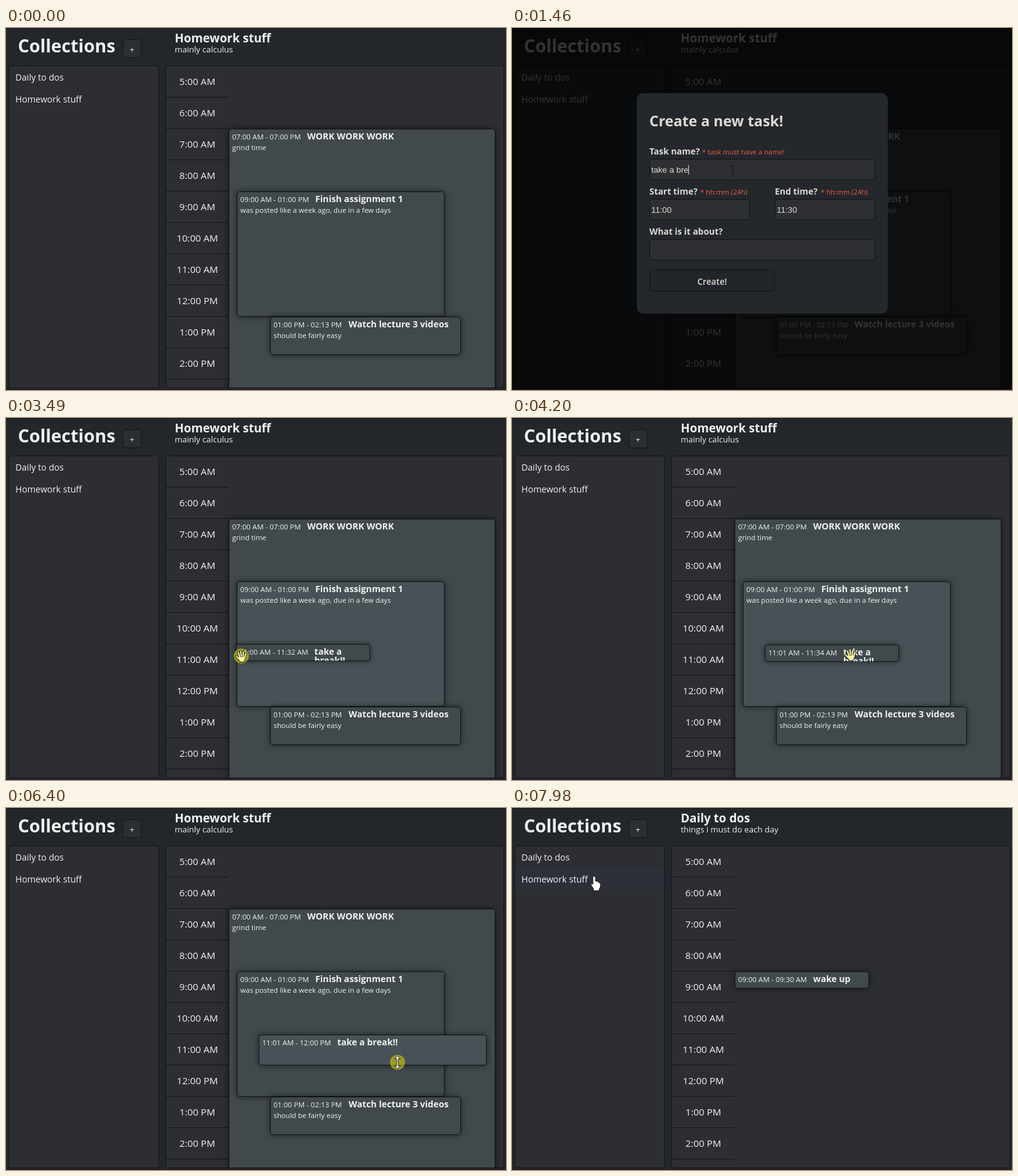
These frames come from a looping animation (797 by 578 pixels, 8000 ms). An HTML page:

```html
<!DOCTYPE html>
<html lang="en">
<head>
<meta charset="utf-8">
<title>Task planner</title>
<style>
html, body { margin: 0; width: 100%; height: 100%; overflow: hidden; background: #23262b; }
svg { display: block; width: 797px; height: 578px; }
text { font-family: "Open Sans", "Noto Sans", sans-serif; font-weight: 500; fill: #f0f2f0; white-space: pre; }
.h1 { font-size: 28.3px; font-weight: 700; }
.h2 { font-size: 18.9px; font-weight: 700; }
.sub { font-size: 13.1px; }
.item { font-size: 14.1px; }
.hour { font-size: 15.2px; text-anchor: middle; }
.time { font-size: 11.5px; }
.note { font-size: 11.35px; }
.name { font-size: 14.2px; font-weight: 700; }
.panel { fill: #2c2e33; stroke: #131518; }
.line { stroke: #131518; }
.card { fill: #41494d; stroke: #131618; filter: drop-shadow(0 0 4px rgba(0,0,0,.62)); }
.card.hot { fill: #485256; }
.field { fill: #2d2f33; stroke: #111316; }
#modal text { fill: #dedad4; }
#modal .title { font-size: 23.2px; font-weight: 700; }
#modal .label { font-size: 13.9px; font-weight: 700; }
#modal .hint { font-size: 11.1px; fill: #ec5d43; }
#modal .input { font: 13.33px "Liberation Sans", Arial, sans-serif; }
#modal .go { font-size: 13.7px; font-weight: 600; text-anchor: middle; }
</style>
</head>
<body>
<svg id="stage" viewBox="0 0 797 578"></svg>
<script>
const LOOP = 8000;
const text = (x, y, cls, str, id = '') => `<text x="${x}" y="${y}" class="${cls}" id="${id}">${str}</text>`;
const box = (x, y, w, h, cls, id = '', r = 4) =>
  `<rect x="${x}" y="${y}" width="${w}" height="${h}" rx="${r}" class="${cls}" id="${id}"/>`;
const card = (x, y, w, h, time, name, note = '', id = '') =>
  box(x, y, w, h, 'card', id) + text(x + 5, y + 16.5, 'time', time) +
  text(x + 124.5, y + 16.5, 'name', name) + text(x + 5, y + 33.5, 'note', note);
const label = (x, y, str, hintX, hint) => text(x, y, 'label', str) + text(hintX, y, 'hint', hint);

let hours = '';
for (let i = 0; i < 10; i++) {
  const h = i + 5, y = 110.5 + i * 50;
  hours += text(305, y - 19.5, 'hour', `${(h - 1) % 12 + 1}:00 ${h < 12 ? 'AM' : 'PM'}`) +
    `<path class="line" d="M255 ${y}H355"/>`;
}

const hand = 'M-2 1.5Q-2 0 0 0T2 1.5V8Q5 7 5.5 9Q8 8.5 8 10.5Q10 10 10 12V16Q10 18 8 20V23H-1V20L-5 14Q-5 11-3 12L-2 13Z';
const fingers = 'M-2.6 1L-4.6-5.5M0 0L-.8-7.5M2.8 0L3.4-6.5M5.4 2L7-3.5M-4 4L-7 1M-4 3L-1 8H3.5L5.6 2Z';
const sizer = 'M0-10.5L4.5-5.5H1.2V5.5H4.5L0 10.5L-4.5 5.5H-1.2V-5.5H-4.5Z';
const shape = (id, d, extra = '') =>
  `<path id="${id}" d="${d}" fill="#fff" stroke="#111" stroke-width=".9" stroke-linejoin="round" ${extra}/>`;

const stage = document.getElementById('stage');
stage.innerHTML = `
<defs>
  <clipPath id="view"><rect x="255" y="61" width="538" height="513"/></clipPath>
  <clipPath id="inside"><rect id="insideBox"/></clipPath>
</defs>
<rect width="797" height="578" fill="#23262b"/>
<path d="M0 .5H797" stroke="#15171a"/><path d="M0 577.5H797" stroke="#241c23"/>
${text(19, 39, 'h1', 'Collections')}
${box(186.5, 18.5, 29, 29, 'panel')}${text(197, 39, 'sub', '+')}
${text(269, 23, 'h2', '', 'head')}${text(269, 39, 'sub', '', 'about')}
${box(4.5, 60.5, 239, 514, 'panel')}
<rect id="row" x="5" width="238" height="35" fill="#2e3039"/>
${text(15, 84, 'item', 'Daily to dos')}${text(15, 119, 'item', 'Homework stuff')}
${box(254.5, 60.5, 539, 514, 'panel')}
${hours}
<g clip-path="url(#view)">
  <g id="homework">
    ${card(355.5, 161.5, 424, 600, '07:00 AM - 07:00 PM', 'WORK WORK WORK', 'grind time')}
    ${card(368.5, 261.5, 330, 199, '09:00 AM - 01:00 PM', 'Finish assignment 1',
      'was posted like a week ago, due in a few days', 'finish')}
    ${card(421.5, 461.5, 303, 60, '01:00 PM - 02:13 PM', 'Watch lecture 3 videos', 'should be fairly easy')}
    <g id="rest">
      ${box(0, 0, 0, 0, 'card', 'restBox')}
      <g clip-path="url(#inside)">
        ${text(0, 0, 'time', '', 'restTime')}${text(0, 0, 'name', '', 'restName')}${text(0, 0, 'name', '', 'restWrap')}
      </g>
    </g>
  </g>
  <g id="daily">${card(355.5, 261.5, 213, 26, '09:00 AM - 09:30 AM', 'wake up')}</g>
</g>
<g id="modal">
  <rect width="797" height="577" fill="#000" opacity=".79"/>
  ${box(199, 104, 400, 352, '', 'sheet', 10)}
  ${text(219, 157, 'title', 'Create a new task!')}
  ${label(219, 202, 'Task name?', 303, '* task must have a name!')}
  ${box(219.5, 209.5, 359, 33, 'field')}${text(222, 231, 'input', '', 'typed')}
  <path id="caret" d="M0 219V234" stroke="#dedad4"/>
  ${label(219, 266, 'Start time?', 300, '* hh:mm (24h)')}${label(419, 266, 'End time?', 492, '* hh:mm (24h)')}
  ${box(219.5, 273.5, 159, 33, 'field')}${text(222, 295, 'input', '11:00')}
  ${box(419.5, 273.5, 159, 33, 'field')}${text(422, 295, 'input', '11:30')}
  ${text(219, 330, 'label', 'What is it about?')}${box(219.5, 337.5, 359, 33, 'field')}
  ${box(219.5, 386.5, 199, 34, 'field', 'button')}${text(319, 410, 'go', 'Create!')}
</g>
<g id="cursor">
  <circle id="press" r="12" fill="rgb(200,195,10)" opacity=".65"/>
  ${shape('hand', hand)}
  ${shape('arrow', 'M0 0V16L3.7 12.6L6.2 18.4L8.7 17.3L6.2 11.6H11.3Z')}
  ${shape('beam', 'M-3-8H3M-3 8H3M0-8V8')}
  ${shape('ns', sizer)}
  ${shape('ew', sizer, 'transform="rotate(90)"')}
  <g id="grab" fill="none" stroke-linecap="round" stroke-linejoin="round">
    <path d="${fingers}" stroke="#222" stroke-width="3.8"/>
    <path d="${fingers}" stroke="#f6f6a4" stroke-width="2.2" fill="#f6f6a4"/>
  </g>
</g>`;

const el = {};
stage.querySelectorAll('[id]').forEach(n => { if (n.id) el[n.id] = n; });
el.sheet.setAttribute('fill', '#24272c');

const set = (node, attrs) => { for (const k in attrs) node.setAttribute(k, attrs[k]); };
const show = (node, on) => node.setAttribute('visibility', on ? 'inherit' : 'hidden');
const write = (node, str) => { if (node.textContent !== str) node.textContent = str; };
const within = (t, a, b) => t >= a && t < b;
const ramp = (t, a, b) => Math.min(1, Math.max(0, (t - a) / (b - a)));

// Smooth interpolation through [time, ...values] points.
function follow(t, keys) {
  let i = 0;
  while (i < keys.length - 2 && t >= keys[i + 1][0]) i++;
  const a = keys[i], b = keys[i + 1], u = ramp(t, a[0], b[0]), e = u * u * (3 - 2 * u);
  return a.slice(1).map((v, k) => v + (b[k + 1] - v) * e);
}

const pointer = [
  [70, 290, 582], [290, 326, 397], [450, 326, 397], [740, 352, 228], [2170, 352, 228],
  [2480, 357, 402], [2890, 357, 402], [3180, 366, 380], [3430, 364, 379], [3490, 375, 380],
  [3680, 384, 381], [3980, 411, 381], [4060, 411, 381], [4300, 615, 376], [4360, 615, 376],
  [4740, 765, 376], [4800, 765, 376], [5120, 672, 386], [5360, 670, 385], [5740, 630, 409],
  [6050, 627, 409], [6250, 625, 408], [6400, 624, 406], [6680, 624, 406], [7460, 83, 82],
  [7940, 83, 82], [7980, 131, 109]
];
const kinds = [
  [0, 'hand'], [600, 'beam'], [2390, 'hand'], [2700, 'grab'], [4240, 'ew'],
  [4860, 'grab'], [5040, 'ns'], [6720, 'arrow'], [7390, 'hand']
];
const presses = [[290, 400], [740, 780], [2540, 2690], [3430, 4000], [4360, 4760], [5360, 6690], [7570, 7650]];
const restX = [[3430, 355.5], [3490, 367], [3680, 376], [3980, 403.5]];
const restY = [[3490, 361.5], [3720, 362.5]];
const restW = [[4360, 213], [4740, 362]];
const restH = [[5360, 26], [5740, 50.5], [6050, 50.5], [6250, 49.5], [6400, 48]];

function clock(min) {
  const h = Math.floor(min / 60), pad = n => String(n).padStart(2, '0');
  return `${pad((h - 1) % 12 + 1)}:${pad(min % 60)} ${h < 12 ? 'AM' : 'PM'}`;
}

function drawRest(t) {
  const [x] = follow(t, restX), [y] = follow(t, restY), [w] = follow(t, restW), [h] = follow(t, restH);
  const moved = t >= 3430, wrap = w < 226;
  const start = 660 + Math.round((y - 361.5) * 1.2);
  const end = moved ? 660 + Math.round((y + h - 361.5) * 1.2 + 1.2) : 690;
  const frame = { x, y, width: w, height: h };
  set(el.restBox, frame);
  set(el.insideBox, frame);
  el.restBox.classList.toggle('hot', t >= 5360);
  set(el.restTime, { x: x + 5, y: y + 16.5 });
  set(el.restName, { x: x + 124.5, y: y + 16.5 });
  set(el.restWrap, { x: x + 124.5, y: y + 30.5 });
  write(el.restTime, `${clock(start)} - ${clock(end)}`);
  write(el.restName, wrap ? 'take a' : 'take a break!!');
  write(el.restWrap, wrap ? 'break!!' : '');
}

function drawModal(t) {
  const fade = ramp(t, 270, 400) * (1 - ramp(t, 2640, 2730));
  show(el.modal, fade > 0);
  set(el.modal, { opacity: fade });
  const count = t < 970 ? 0 : Math.min(12, 1 + Math.floor((t - 970) / 50.9)) + (t >= 1810) + (t >= 1890);
  write(el.typed, 'take a break!!'.slice(0, count));
  show(el.caret, within(t, 760, 2540));
  set(el.caret, { transform: `translate(${Math.round(222 + el.typed.getComputedTextLength()) + .5} 0)` });
  const hover = t < 520 || t > 2440;
  el.button.style.fill = t > 2540 ? '#1f2326' : hover ? '#24292d' : '#212429';
}

function drawCursor(t) {
  const [x, y] = follow(t, pointer);
  show(el.cursor, t >= 70);
  set(el.cursor, { transform: `translate(${x} ${y})` });
  const kind = kinds.filter(k => k[0] <= t).pop()[1];
  for (const id of ['hand', 'arrow', 'beam', 'ns', 'ew', 'grab']) show(el[id], id === kind);
  show(el.press, presses.some(p => within(t, ...p)));
}

function draw(t) {
  const daily = t >= 7600;
  write(el.head, daily ? 'Daily to dos' : 'Homework stuff');
  write(el.about, daily ? 'things i must do each day' : 'mainly calculus');
  show(el.homework, !daily);
  show(el.daily, daily);
  show(el.row, t >= 7440);
  set(el.row, { y: t < 7960 ? 61 : 96 });
  show(el.rest, t >= 2690 && !daily);
  el.finish.classList.toggle('hot', within(t, 3180, 5290));
  drawRest(t);
  drawModal(t);
  drawCursor(t);
}

const begin = performance.now();
function tick() {
  draw((performance.now() - begin) % LOOP);
  requestAnimationFrame(tick);
}
tick();
</script>
</body>
</html>
```
